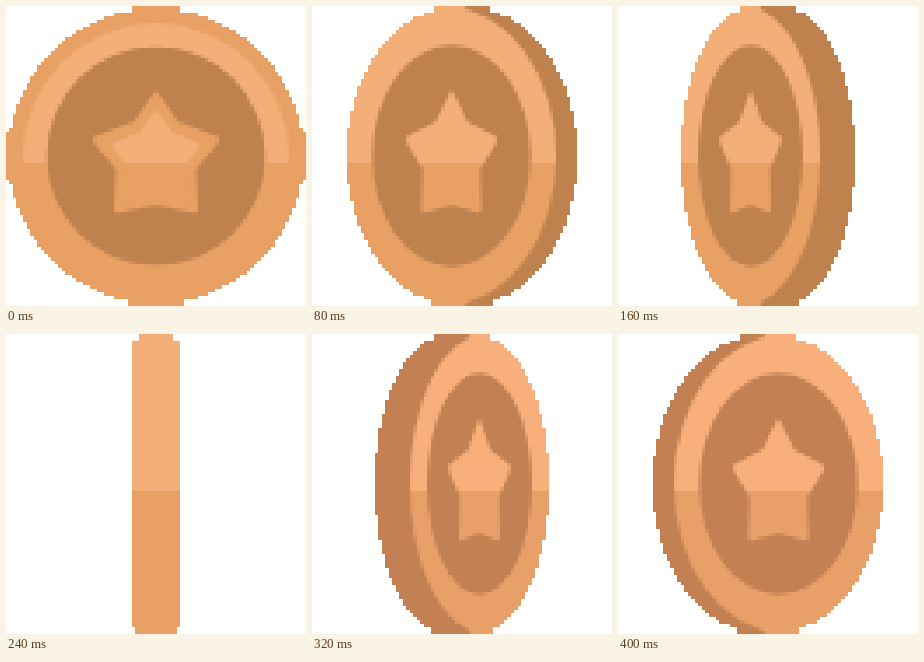
An HTML page with a canvas that plays this animation: 300x300 px, repeating every 480 ms.

```html
<!DOCTYPE html>
<html lang="en">
<head>
<meta charset="utf-8">
<title>Spinning coin</title>
<style>
  html, body { margin: 0; width: 100%; height: 100%; overflow: hidden; background: #fff; }
  canvas { display: block; width: 100vw; height: 100vh; image-rendering: pixelated; }
</style>
</head>
<body>
<canvas id="coin" width="86" height="86"></canvas>
<script>
const ctx = document.getElementById('coin').getContext('2d');
const SIZE = 86, MID = 43, HORIZON = 45, RADIUS = 42.2;
const STEP = 80;

const bronze = { light: '#f4af78', mid: '#e8a064', dark: '#bf814e' };
const copper = { light: '#f8af7c', mid: '#e99f68', dark: '#c28053' };

// Right half of the star, relative to its vertical axis, on a 300 unit stage
const STAR = [[0, 90], [20, 119], [59, 134], [36, 162], [38, 203], [0, 195]];

// shift: how far the front face sits from the middle; rx: face, inner: recess
const POSES = [
  { shift: 0, rx: RADIUS, inner: 31.3, star: 1, tone: bronze },
  { shift: 3, rx: 30, inner: 22.7, star: 0.72, tone: bronze },
  { shift: 5, rx: 20, inner: 15, star: 0.49, tone: bronze },
  { edge: true, tone: bronze },
  { shift: 5, rx: 20, inner: 15, star: 0.49, tone: copper, flip: true },
  { shift: 3, rx: 30, inner: 22.7, star: 0.72, tone: copper, flip: true }
];

function rect(x0, y0, x1, y1, fill) {
  ctx.fillStyle = fill;
  ctx.fillRect(x0, y0, x1 - x0, y1 - y0);
}

// Horizontal bar centred on the axis
function bar(half, y0, y1, fill) {
  rect(MID - half, y0, MID + half, y1, fill);
}

function oval(cx, rx, ry, fill) {
  ctx.beginPath();
  ctx.ellipse(cx, MID, rx, ry, 0, 0, Math.PI * 2);
  ctx.fillStyle = fill;
  ctx.fill();
}

// Light above the horizon, mid tone below it
function twoTone(tone) {
  const g = ctx.createLinearGradient(0, 0, 0, SIZE);
  const stop = HORIZON / SIZE;
  g.addColorStop(0, tone.light);
  g.addColorStop(stop, tone.light);
  g.addColorStop(stop, tone.mid);
  g.addColorStop(1, tone.mid);
  return g;
}

function star(cx, width, fill, inset = 1) {
  const k = SIZE / 300, cy = 151;
  const left = STAR.slice(1, -1).reverse().map(([x, y]) => [-x, y]);
  ctx.save();
  ctx.translate(cx, 0);
  ctx.scale(width, 1);
  ctx.beginPath();
  for (const [x, y] of [...STAR, ...left]) {
    ctx.lineTo(x * inset * k, (cy + (y - cy) * inset) * k);
  }
  ctx.closePath();
  ctx.fillStyle = ctx.strokeStyle = fill;
  ctx.lineWidth = 8 * k;
  ctx.lineJoin = 'round';
  ctx.fill();
  ctx.stroke();
  ctx.restore();
}

// Stepped outline joining the front and back faces
function outline({ rx, shift }, fill) {
  for (let y = 2; y < SIZE - 2; y++) {
    const dy = (y + 0.5 - MID) / RADIUS;
    const half = rx * Math.sqrt(1 - dy * dy) + shift;
    bar(Math.round(half), y, y + 1, fill);
  }
  const head = shift ? 8 : 7;
  bar(head, 0, 2, fill);
  bar(head + 1, SIZE - 2, SIZE, fill);
}

function drawEdge({ tone }) {
  const fill = twoTone(tone);
  bar(5, 0, 2, fill);
  bar(7, 2, SIZE - 2, fill);
  bar(6, SIZE - 2, SIZE, fill);
}

function drawFront({ rx, shift, inner, tone }) {
  const fill = twoTone(tone);
  outline({ rx, shift }, tone.mid);
  bar(MID, MID - 7, MID + 7, tone.mid);
  oval(MID, 38, 38, fill);
  oval(MID, inner, inner, tone.dark);
  star(MID, 1, tone.mid);
  star(MID, 1, fill, 0.68);
}

function drawTurned({ shift, rx, inner, star: width, tone }) {
  const fill = twoTone(tone), cx = MID - shift;
  const rim = cx + rx * 0.14;
  outline({ rx, shift }, tone.dark);
  ctx.globalCompositeOperation = 'source-atop';
  oval(cx - 1, rx + 1, RADIUS + 0.3, fill);
  rect(0, 0, rim, 2, tone.light);
  rect(0, SIZE - 2, rim, SIZE, tone.mid);
  oval(cx, inner, 31.7, tone.dark);
  star(cx, width, fill);
}

function draw(time) {
  const pose = POSES[Math.floor(time / STEP) % POSES.length];
  ctx.clearRect(0, 0, SIZE, SIZE);
  ctx.save();
  if (pose.flip) {
    ctx.translate(SIZE, 0);
    ctx.scale(-1, 1);
  }
  if (pose.edge) drawEdge(pose);
  else if (pose.shift) drawTurned(pose);
  else drawFront(pose);
  ctx.restore();
}

const start = performance.now();
function tick() {
  draw(performance.now() - start);
  requestAnimationFrame(tick);
}
tick();
</script>
</body>
</html>
```
